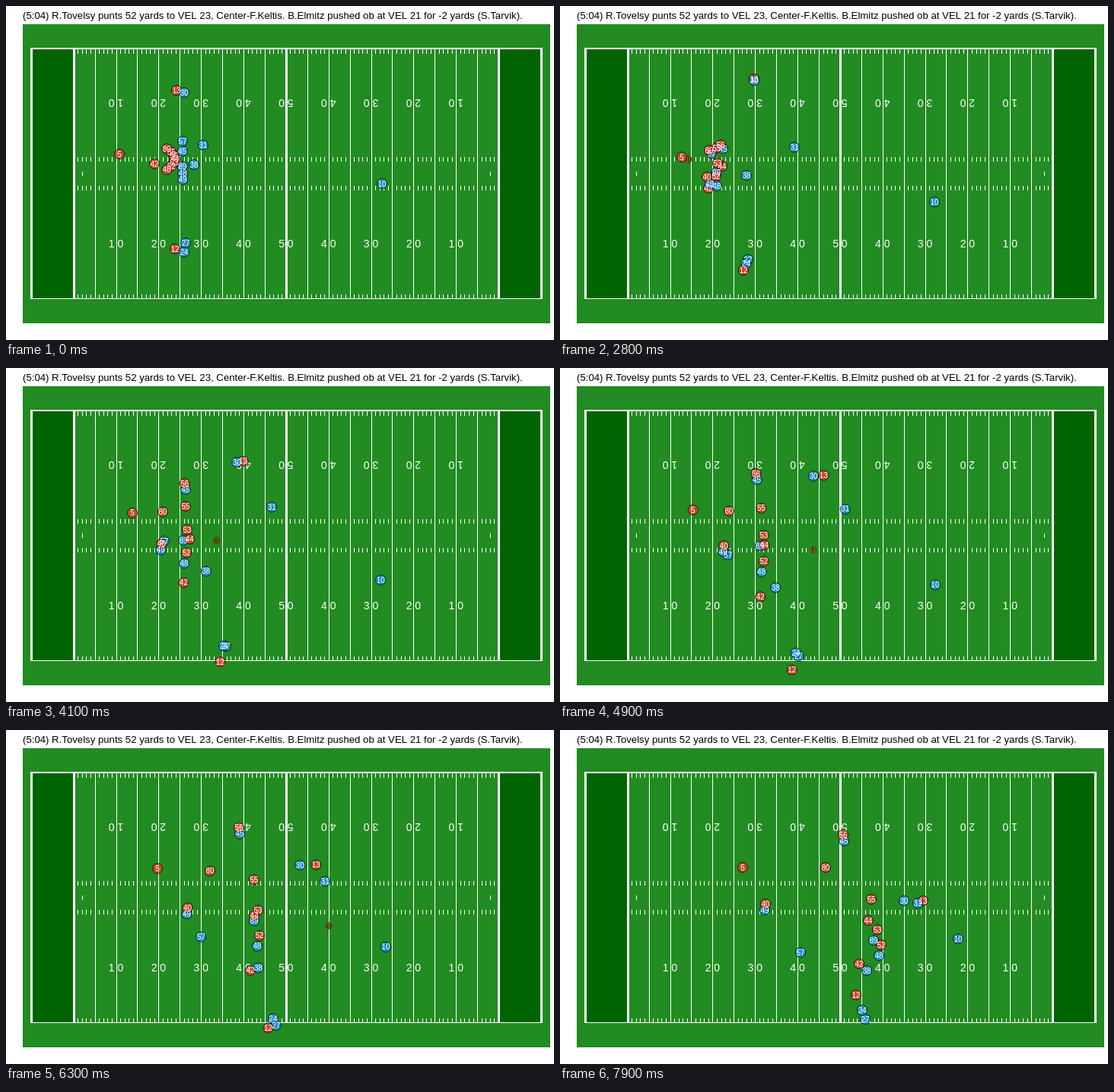
Write an HTML page with a canvas that moves like this. It is 720 px wide and 440 px high and loops after 8000 ms.

```html
<!DOCTYPE html>
<html lang="en">
<head>
<meta charset="utf-8">
<title>Punt play</title>
<style>
html, body { margin: 0; width: 720px; height: 440px; overflow: hidden; background: #fff; }
canvas { display: block; }
</style>
</head>
<body>
<canvas id="stage" width="720" height="440"></canvas>
<script>
const ctx = document.getElementById('stage').getContext('2d');
const FONT = '"Liberation Sans", Arial, sans-serif';
const RED = '#ff3030', BLUE = '#1e90ff', BROWN = '#663300';
const LOOP = 8000, STEP = 100;
const SNAP = 1000, CATCH = 1700, KICK = 2800, END = 7900;
const TOP = 56, BOTTOM = 385;

const yardX = yard => 89.22 + 5.583 * yard;
const clamp = u => Math.min(1, Math.max(0, u));
const smooth = u => u * u * (3 - 2 * u);
const mix = ([ax, ay], [bx, by], u) => [ax + (bx - ax) * u, ay + (by - ay) * u];
const shift = ([x, y], [dx, dy]) => [x + dx, y + dy];

// From `from` to `to` after the kick; pace > 1 builds up speed, bend bows the path downwards.
function flight(from, to, pace, bend, t) {
  const u = clamp((t - KICK) / (END - KICK));
  return shift(mix(from, to, u ** pace), [0, bend * 4 * u * (1 - u)]);
}

const players = new Map();

// Drifts from the start to a blocking spot until the kick, then runs downfield.
function run(number, color, start, block, finish, pace, bend) {
  const at = t => t < KICK ? mix(start, block, (t / KICK) ** 3) : flight(block, finish, pace, bend, t);
  players.set(number, { color, at });
}

// Stays with a leader while the gap between the two changes.
function follow(number, leader, firstGap, lastGap, duration = 4000) {
  const at = t => shift(players.get(leader).at(t), mix(firstGap, lastGap, smooth(clamp(t / duration))));
  players.set(number, { color: BLUE, at });
}

// Seven linemen in a shallow wedge around the center.
const lineSpot = i => [222 - 1.2 * (i - 3) ** 2, 188 + 4.6 * i];

run(13, RED, [224, 111], [255, 96], [477, 225], 1, -8);
run(42, RED, [195, 208], [195, 240], [393, 308], 1.2, 39);
run(10, BLUE, [494, 234], [492, 258], [523, 275], 4, 28);
run(27, BLUE, [236, 312], [247, 334], [401, 381], 0.95, 26);
run(31, BLUE, [259, 183], [308, 186], [470, 228], 1, -18);
run(38, BLUE, [247, 209], [245, 223], [403, 317], 1.6, 45);
run(57, BLUE, [232, 178], [199, 194], [316, 293], 1.9, 35);
follow(24, 27, [-2, 12], [-4, -12], LOOP);
follow(30, 13, [10, 3], [-25, 0], LOOP);
follow(45, 56, [11, -6], [1, 8]);
follow(48, 52, [15, 9], [-3, 14]);
follow(49, 40, [21, 13], [-1, 8]);
follow(89, 53, [11, 5], [-5, 14]);
run(5, RED, [149, 195], [160, 199], [240, 181], 1.9, -9);
run(12, RED, [222, 320], [241, 348], [389, 349], 0.95, 51);
run(80, RED, lineSpot(0), [196, 190], [349, 181], 2, 0);
run(55, RED, lineSpot(1), [206, 187], [409, 223], 1.4, -13);
run(56, RED, lineSpot(2), [211, 183], [372, 138], 1.4, -32);
run(44, RED, lineSpot(3), [213, 211], [405, 251], 1.4, 11);
run(53, RED, lineSpot(4), [207, 207], [417, 263], 1.4, -3);
run(52, RED, lineSpot(5), [205, 224], [422, 283], 1.4, 14);
run(40, RED, lineSpot(6), [193, 225], [270, 229], 1.4, 8);

// Snapped to the punter, carried, then kicked to the returner.
function ballAt(t) {
  const hands = shift(players.get(5).at(Math.min(t, KICK)), [9, 3]);
  if (t < KICK) return mix(lineSpot(3), hands, clamp((t - SNAP) / (CATCH - SNAP)));
  return flight(hands, players.get(10).at(END), 0.87, 4, t);
}

function rect(color, x, y, w, h) {
  ctx.fillStyle = color;
  ctx.fillRect(x, y, w, h);
}

function text(label, x, y, size, color = '#fff', align = 'center') {
  ctx.font = `${size}px ${FONT}`;
  ctx.textAlign = align;
  ctx.fillStyle = color;
  ctx.fillText(label, x, y);
}

function drawField() {
  const height = BOTTOM - TOP;
  rect('#fff', 0, 0, 720, 440);
  text('(5:04) R.Tovelsy punts 52 yards to VEL 23, Center-F.Keltis. B.Elmitz pushed ob at VEL 21 for -2 yards (S.Tarvik).',
    22, 17, 13.2, '#000', 'left');
  rect('#228b22', 22, 24, 693, 394);
  rect('#006400', 34, TOP, 55, height);
  rect('#006400', 648, TOP, 55, height);

  for (let yard = 1; yard < 100; yard++) {
    const x = Math.floor(yardX(yard));
    if (yard % 5 === 0) rect('#fff', x, TOP, 1, height);
    else for (const y of [57, 199, 237, 380]) rect('#fff', x, y, 1, y === 380 ? 5 : 6);
  }
  for (const yard of [2, 98]) rect('#fff', Math.floor(yardX(yard)), 218, 1, 6);
  for (const x of [32, 88, 367, 646, 702]) rect('#fff', x, TOP, 3, height);
  rect('#fff', 32, 55, 673, 2);
  rect('#fff', 32, BOTTOM, 673, 1);

  for (let yard = 10; yard < 100; yard += 10) {
    const label = `${Math.min(yard, 100 - yard) / 10} 0`, x = yardX(yard) - 0.5;
    text(label, x, 318, 14);
    ctx.save();
    ctx.translate(x, 128);
    ctx.rotate(Math.PI);
    text(label, 0, 5, 14);
    ctx.restore();
  }
}

function disc([x, y], radius, fill, stroke) {
  ctx.beginPath();
  ctx.arc(x, y, radius, 0, 2 * Math.PI);
  ctx.fillStyle = fill;
  ctx.fill();
  ctx.strokeStyle = stroke;
  ctx.stroke();
}

function drawPlay(t) {
  ctx.globalAlpha = 0.7;
  disc(ballAt(t), 4.2, BROWN, BROWN);
  for (const { color, at } of players.values()) disc(at(t), 6.6, color, '#000');
  ctx.globalAlpha = 1;
  for (const [number, { at }] of players) {
    const [x, y] = at(t);
    text(number, x, y + 3.6, 10);
  }
}

const start = performance.now();
function frame() {
  const t = (performance.now() - start) % LOOP;
  drawField();
  drawPlay(Math.floor(t / STEP) * STEP);
  requestAnimationFrame(frame);
}
frame();
</script>
</body>
</html>
```
